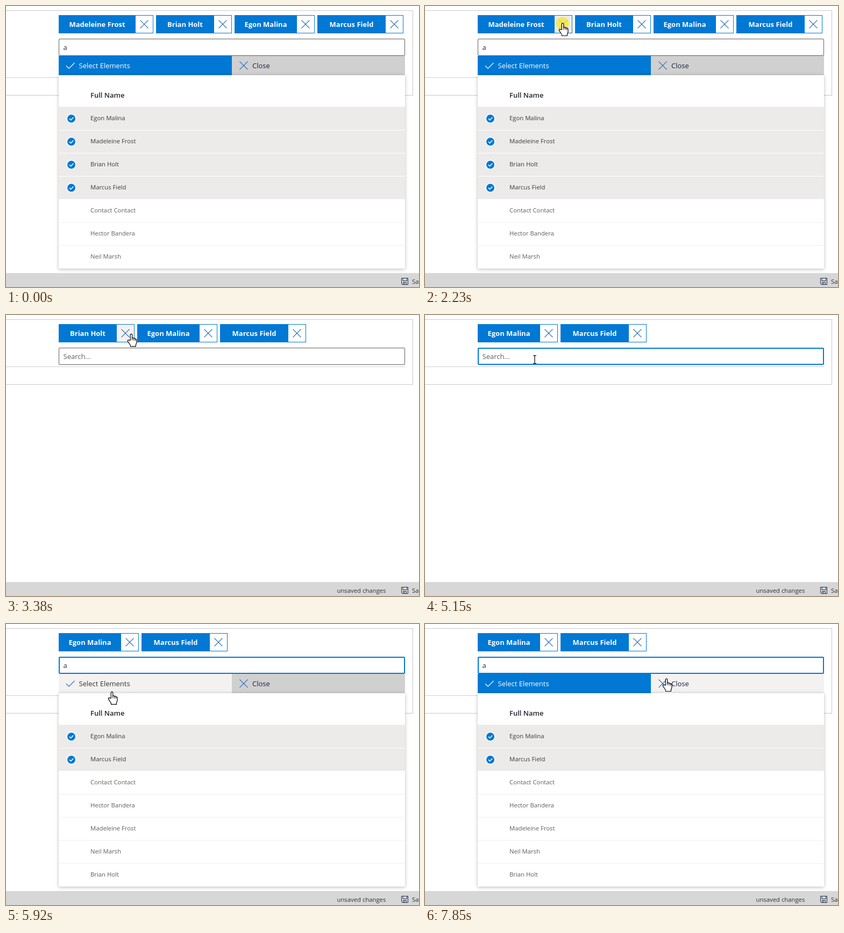
Recreate the animation shown at these times as an HTML page. Size 768x524 px, loop 8000 ms.

```html
<!DOCTYPE html>
<html lang="en">
<head>
<meta charset="utf-8">
<title>People picker</title>
<style>
html, body { margin: 0; width: 100%; height: 100%; overflow: hidden; background: #fff; }
svg { display: block; width: 100vw; height: 100vh; font: 13px "Open Sans", "Noto Sans", sans-serif; }
text { white-space: pre; }
.panel { filter: drop-shadow(0 1px 3px #0004); }
.bold { font-weight: 700; }
.semi { font-weight: 600; }
.small { font-size: 11.3px; }
</style>
</head>
<body>
<svg id="stage" viewBox="0 0 768 524"></svg>
<script>
const LOOP = 8000, BLUE = '#0078d4', INK = '#17233d', HOVER = '#f3f2f1';

const MADELEINE = 'Madeleine Frost', BRIAN = 'Brian Holt', EGON = 'Egon Malina', MARCUS = 'Marcus Field';
const CONTACT = 'Contact Contact', HECTOR = 'Hector Bandera', NEIL = 'Neil Marsh';
const chipWidth = { [MADELEINE]: 176, [BRIAN]: 141, [EGON]: 149, [MARCUS]: 160 };

// Moments of the interaction, in ms
const CURSOR_IN = 130, CLOSED = 2290, REMOVED_1 = 2460, REMOVED_2 = 3760,
      FOCUS = 4620, TYPED = 5240, OPENED = 5310;
const clicks = [[2140, 2290], [3610, 3760], [4620, 4700]];

// Pointer route: time, x, y
const route = [
  [130, 646, 480], [360, 640, 470], [670, 640, 470], [1440, 255, 37],
  [1520, 255, 37], [1590, 256, 32], [3070, 256, 32], [3460, 227, 36],
  [4200, 227, 36], [4310, 205, 89], [4500, 205, 89], [4620, 204, 83],
  [5720, 204, 83], [5920, 197, 126], [6400, 214, 247], [6540, 216, 247],
  [6650, 216, 247], [6850, 218, 164], [6920, 222, 123], [7050, 222, 123],
  [7550, 449, 102]
];

const rect = (x, y, w, h, fill, more = '') =>
  `<rect x="${x}" y="${y}" width="${w}" height="${h}" fill="${fill}" ${more}/>`;
const frame = (x, y, w, h, color, line = 1, more = '') =>
  rect(x + line / 2, y + line / 2, w - line, h - line, 'none', `stroke="${color}" stroke-width="${line}" ${more}`);
const text = (x, y, str, fill, cls = '', more = '') =>
  `<text x="${x}" y="${y}" fill="${fill}" class="${cls}" ${more}>${str}</text>`;
const path = (d, stroke, width = 1, fill = 'none') =>
  `<path d="${d}" stroke="${stroke}" stroke-width="${width}" fill="${fill}"/>`;
const circle = (x, y, r, fill, more = '') => `<circle cx="${x}" cy="${y}" r="${r}" fill="${fill}" ${more}/>`;
const cross = (x, y) => path(`M${x - 7.5} ${y - 7.5}l15 15m0-15l-15 15`, '#2f6fc0', 1.1);
const emptyCheck = y => circle(121.5, y, 8.5, '#fff', 'stroke="#605e5c"');

function pointerAt(t) {
  const i = route.findIndex(p => p[0] > t);
  if (i < 0) return route.at(-1).slice(1);
  if (i === 0) return [-99, -99];
  const [t0, x0, y0] = route[i - 1], [t1, x1, y1] = route[i];
  const k = (t - t0) / (t1 - t0);
  return [x0 + (x1 - x0) * k, y0 + (y1 - y0) * k];
}

function pointer(kind, x, y) {
  const shapes = {
    arrow: path('M0 0V16.5L3.8 13 6.5 19 9 18 6.5 12H11.5Z', '#000', 1, '#fff'),
    beam: path('M-3 -7.5H-1L0 -6.5 1 -7.5H3M0 -6.5V6.5M-3 7.5H-1L0 6.5 1 7.5H3', '#000', 1.2),
    hand: path('M-1.7 12V1.8a1.7 1.7 0 0 1 3.4 0V8c.9-1 2.8-.7 3 .7 1-.8 2.6-.4 2.8.9 1.2-.5 2.5.3 2.5 1.7V16c0 2.3-1.6 3-1.6 5.5V23.5H-1.5V22c0-2-3.5-5-5-8.5-.8-1.8 1.2-2.8 2.5-1.6z', '#000', 1.2, '#fff')
      + path('M1.7 8v4M4.7 9v3.5M7.5 10v3', '#000')
  };
  return `<g transform="translate(${x.toFixed(1)} ${y.toFixed(1)})">${shapes[kind]}</g>`;
}

function draw(t) {
  const [px, py] = pointerAt(t);
  const over = (x, y, w, h) => px >= x && px < x + w && py >= y && py < y + h;
  const open = t < CLOSED || t >= OPENED;
  const pressed = clicks.some(([from, to]) => t >= from && t < to);
  const focused = t >= FOCUS, typed = t < CLOSED || t >= TYPED;
  let kind = 'arrow', out = '';

  // Form frame and divider
  out += frame(-5, 8, 762, open ? 159 : 122, '#c8c8c8');
  out += rect(0, open ? 133 : 96, 742, 1, '#d2d0ce');

  // Chips
  const chips = [MADELEINE, BRIAN, EGON, MARCUS].slice(t < REMOVED_1 ? 0 : t < REMOVED_2 ? 1 : 2);
  let x = 98;
  for (const name of chips) {
    const w = chipWidth[name], label = w - 33;
    const onLabel = over(x, 17, label, 34), onCross = over(x + label, 17, 33, 34);
    if (onLabel || onCross) kind = 'hand';
    out += rect(x, 17, w, 34, BLUE);
    if (onLabel) out += rect(x + 1, 18, label - 1, 32, HOVER);
    out += rect(x + label, 18, 32, 32, onCross ? (pressed ? '#edebe9' : HOVER) : '#fff');
    out += text(x + label / 2, 39, name, onLabel ? '#201f1e' : '#fff', 'bold', 'text-anchor="middle"');
    out += cross(x + label + 16, 34);
    x += w + 5;
  }

  // Search field
  const onInput = over(98, 61, 644, 32);
  if (onInput) kind = 'beam';
  out += rect(98, 61, 644, 32, '#fff', 'rx="2"');
  out += focused ? frame(98, 61, 644, 32, BLUE, 2, 'rx="1"')
                 : frame(98, 61, 644, 32, onInput ? '#201f1e' : '#605e5c', 1, 'rx="1.5"');
  out += typed ? text(106.5, 82, 'a', '#323130') : text(106.5, 82, 'Search...', '#605e5c');

  if (open) {
    // Command buttons
    const onSelect = over(98, 93, 322, 36), onClose = over(420, 93, 322, 36);
    if (onSelect || onClose) kind = 'hand';
    out += rect(98, 93, 322, 36, onSelect ? HOVER : BLUE);
    out += rect(420, 93, 322, 36, onClose ? HOVER : '#d0d0d0');
    out += path('M112 111.5l5 5 10.5-10.5', onSelect ? '#2f6fc0' : '#fff', 1.2);
    out += text(135.5, 116, 'Select Elements', onSelect ? '#323130' : '#fff');
    out += cross(442, 111) + text(458, 116, 'Close', INK);

    // List
    out += rect(98, 129, 644, 361, '#fff', 'class="panel"');
    if (over(98, 145, 644, 43)) out += rect(146, 145, 596, 42, HOVER) + emptyCheck(166);
    out += text(157, 171, 'Full Name', '#24262e', 'semi');

    const late = t >= OPENED;
    const names = late ? [EGON, MARCUS, CONTACT, HECTOR, MADELEINE, NEIL, BRIAN]
                       : [EGON, MADELEINE, BRIAN, MARCUS, CONTACT, HECTOR, NEIL];
    const count = late ? 2 : 4;
    const fade = late ? Math.min(1, (t - OPENED + 80) / 310) : 1;
    out += `<g opacity="${fade.toFixed(2)}">`;
    names.forEach((name, i) => {
      const top = 188 + 43 * i, chosen = i < count, on = over(98, top, 644, 43);
      if (chosen || on) out += rect(98, top, 644, 43, chosen ? (on ? '#e1dfdd' : '#ecebe9') : HOVER);
      if (chosen) {
        out += circle(121.5, top + 22, 9, '#fff') + circle(121.5, top + 22, 7.5, BLUE);
        out += path(`M118 ${top + 22}l2.5 2.7 4.8-5`, '#fff', 1.6);
      } else if (on) out += emptyCheck(top + 21.5);
      out += text(157, top + 25, name, chosen ? '#3b3a39' : '#605e5c', 'small');
    });
    names.forEach((_, i) => out += rect(98, 231 + 43 * i, 644, 1, i < count ? '#fff' : '#f0efee'));
    out += '</g>';
  }

  // Footer
  out += rect(0, 498, 768, 26, '#d7d7d7');
  if (t >= REMOVED_1) out += text(615.5, 518, 'unsaved changes', '#323130', 'small');
  out += path('M735.5 507.5h12v12h-10.5l-1.5-1.5zM738 507.5v5h7.5v-5M738.5 519.5v-4h6v4M741 516v3', '#243552');
  out += text(755, 518, 'Save', '#323130', 'small');

  // Blinking caret
  if (t >= FOCUS && t < 5150) out += rect(107, 67, 1, 19, '#000');
  if (t >= TYPED && (t - TYPED) % 1044 < 522) out += rect(114, 67, 1, 19, '#000');

  if (pressed) out += circle(px - .5, py + .5, 12, '#f5e63c', 'opacity=".82"');
  if (t >= CURSOR_IN) out += pointer(kind, px, py);
  return out;
}

const stage = document.getElementById('stage');
let shown = '';
function tick() {
  const next = draw(performance.now() % LOOP);
  if (next !== shown) stage.innerHTML = shown = next;
  requestAnimationFrame(tick);
}
tick();
</script>
</body>
</html>
```
